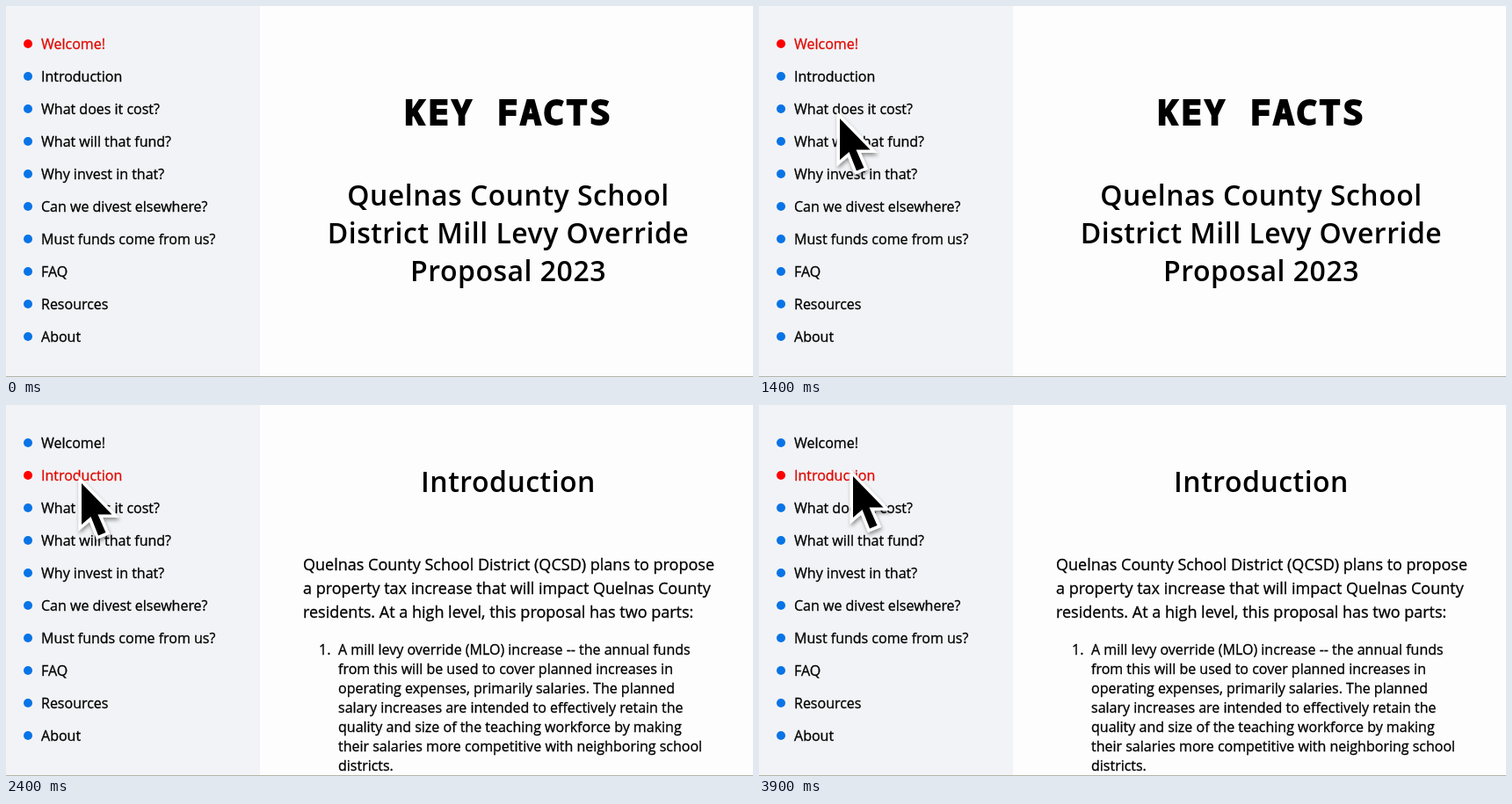
Write an HTML page that moves like this. It is 850 px wide and 422 px high and loops after 4000 ms.

```html
<!DOCTYPE html>
<html lang="en">
<head>
<meta charset="utf-8">
<title>Key facts</title>
<style>
  html, body { margin: 0; width: 100%; height: 100%; overflow: hidden; background: #fdfdfd; }
  svg { display: block; width: 850px; height: 422px; font: 16px "Open Sans", sans-serif; }
  text { fill: currentColor; stroke: currentColor; stroke-width: .3px; }
  .heading { font-size: 32px; font-weight: 600; letter-spacing: .5px; text-anchor: middle; stroke: none; }
  .banner { font: 900 40px "Noto Sans Mono", monospace; letter-spacing: 2.2px; text-anchor: middle; stroke-width: 1.8px; }
  .lead { font-size: 18px; }
</style>
</head>
<body>
<svg id="stage" viewBox="0 0 850 422">
  <defs>
    <filter id="shadow" x="-50%" y="-50%" width="200%" height="200%">
      <feDropShadow dx="1" dy="3" stdDeviation="2.2" flood-opacity=".4"/>
    </filter>
  </defs>
  <rect width="850" height="422" fill="#fdfdfd"/>
  <rect width="289" height="422" fill="#f2f3f6"/>
  <g id="menu"></g>
  <g id="welcome"></g>
  <g id="intro"></g>
  <rect y="421" width="850" height="1" fill="#b4b4a8"/>
  <path id="cursor" d="M0 0V47L10.5 38L19 59.5L27.5 56L18.5 35.5H34.5Z" stroke="#fff" stroke-width="7"
    stroke-linejoin="miter" paint-order="stroke" filter="url(#shadow)"/>
</svg>
<script>
const LOOP = 4000, STEP = 100, PAGE_SWITCH = 2400;
const BLUE = "#0874e6", RED = "#f00", RED_TEXT = "#e00800";
const byId = id => document.getElementById(id);

function add(parent, tag, attrs, text = "") {
  const node = document.createElementNS("http://www.w3.org/2000/svg", tag);
  for (const key in attrs) node.setAttribute(key, attrs[key]);
  node.textContent = text;
  return parent.appendChild(node);
}

function addLines(parent, lines, x, y, leading, className = "") {
  lines.forEach((line, i) => add(parent, "text", { x, y: y + i * leading, class: className }, line));
}

const menu = ["Welcome!", "Introduction", "What does it cost?", "What will that fund?",
  "Why invest in that?", "Can we divest elsewhere?", "Must funds come from us?",
  "FAQ", "Resources", "About"].map((label, i) => ({
    dot: add(byId("menu"), "circle", { cx: 25, cy: 43 + i * 37, r: 5 }),
    text: add(byId("menu"), "text", { x: 40, y: 49 + i * 37 }, label)
  }));

const welcome = byId("welcome"), intro = byId("intro"), cursor = byId("cursor");
addLines(welcome, ["KEY FACTS"], 572, 135, 0, "banner");
addLines(welcome, ["Quelnas County School", "District Mill Levy Override", "Proposal 2023"],
  571.5, 227, 43, "heading");

addLines(intro, ["Introduction"], 571.5, 99, 0, "heading");
addLines(intro, [
  "Quelnas County School District (QCSD) plans to propose",
  "a property tax increase that will impact Quelnas County",
  "residents. At a high level, this proposal has two parts:"
], 338, 188, 27, "lead");
addLines(intro, ["1."], 356, 284, 0);
addLines(intro, [
  "A mill levy override (MLO) increase -- the annual funds",
  "from this will be used to cover planned increases in",
  "operating expenses, primarily salaries. The planned",
  "salary increases are intended to effectively retain the",
  "quality and size of the teaching workforce by making",
  "their salaries more competitive with neighboring school",
  "districts."
], 378, 284, 22);

// Cursor tip over time: [ms, x, y]
const path = [
  [600, 445, 450], [800, 350, 360], [1000, 248, 268], [1200, 153, 184], [1400, 92, 128],
  [1800, 81, 103], [2300, 83, 93], [2400, 86, 89], [3400, 86, 89], [3900, 107, 81]
];

function slope(i, axis) {
  if (i === 0) return (path[1][axis] - path[0][axis]) / (path[1][0] - path[0][0]);
  if (i === path.length - 1) return 0;
  const [a, b, c] = path.slice(i - 1, i + 2);
  const before = (b[axis] - a[axis]) / (b[0] - a[0]);
  const after = (c[axis] - b[axis]) / (c[0] - b[0]);
  return before * after <= 0 ? 0 : 2 * before * after / (before + after);
}

// Monotone cubic interpolation between neighbouring path points
function tipAt(t, axis) {
  let i = path.findIndex(p => p[0] > t) - 1;
  if (i < 0) i = path.length - 2;
  const [a, b] = [path[i], path[i + 1]];
  const span = b[0] - a[0], u = Math.min(1, (t - a[0]) / span);
  const u2 = u * u, u3 = u2 * u;
  return a[axis] * (2 * u3 - 3 * u2 + 1) + b[axis] * (3 * u2 - 2 * u3)
    + span * (slope(i, axis) * (u3 - 2 * u2 + u) + slope(i + 1, axis) * (u3 - u2));
}

function render(time) {
  const t = Math.floor(time % LOOP / STEP) * STEP;
  const page = t < PAGE_SWITCH ? 0 : 1;
  welcome.style.display = page ? "none" : "";
  intro.style.display = page ? "" : "none";
  menu.forEach(({ dot, text }, i) => {
    dot.setAttribute("fill", i === page ? RED : BLUE);
    text.setAttribute("color", i === page ? RED_TEXT : "#000");
  });
  cursor.style.display = t > path[0][0] ? "" : "none";
  if (t > path[0][0]) cursor.setAttribute("transform", `translate(${tipAt(t, 1)} ${tipAt(t, 2)})`);
}

function tick() {
  render(performance.now());
  requestAnimationFrame(tick);
}
tick();
</script>
</body>
</html>
```
